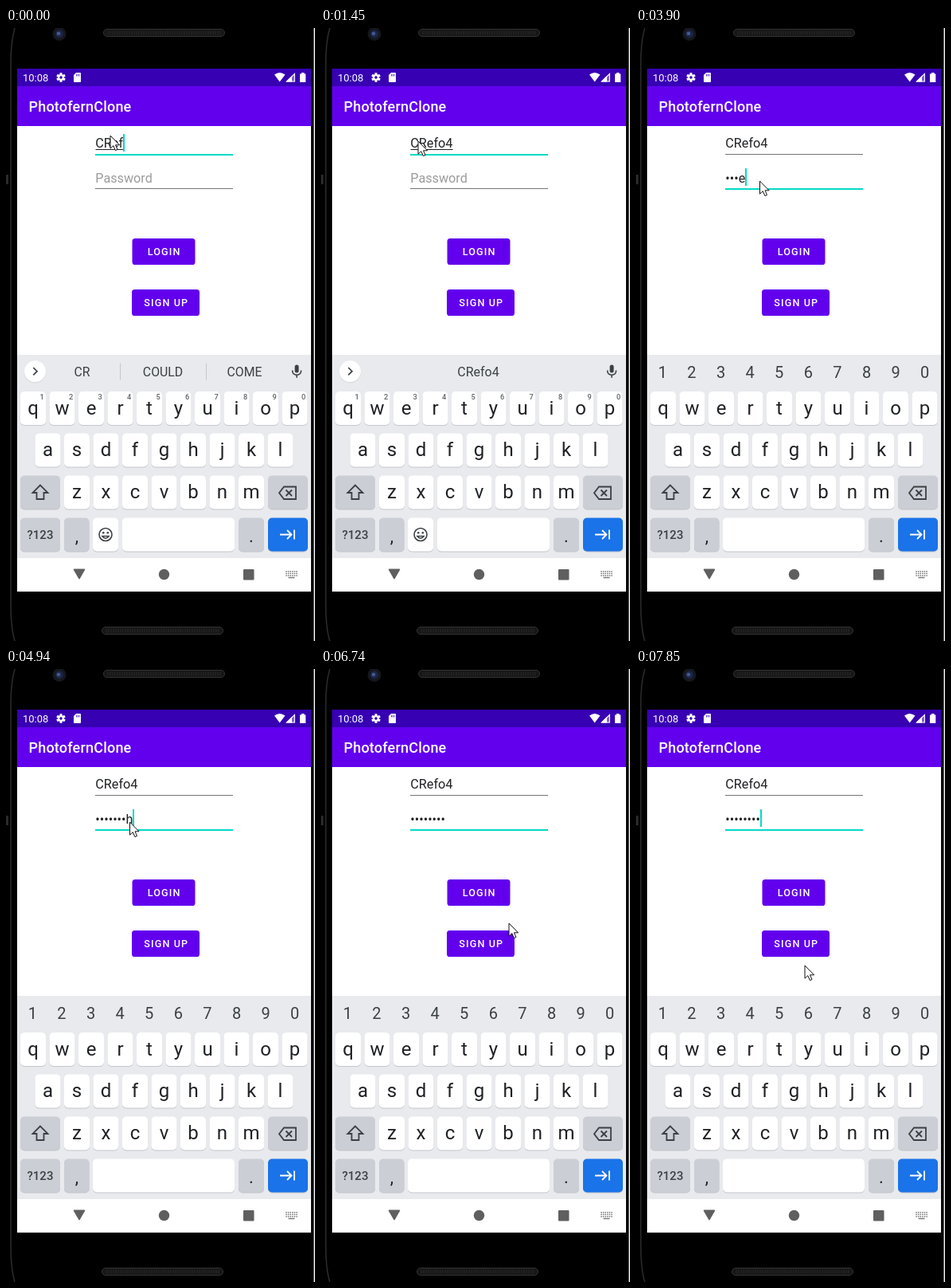
An HTML page for the animation above (8 s loop, 388x769 px).

```html
<!DOCTYPE html>
<html lang="en">
<head>
<meta charset="utf-8">
<title>Login screen</title>
<style>
html, body { margin: 0; width: 100%; height: 100%; overflow: hidden; background: #000; }
svg { display: block; width: 388px; height: 769px; font-family: Roboto, sans-serif; }
</style>
</head>
<body>
<svg id="stage" viewBox="0 0 388 769" xmlns="http://www.w3.org/2000/svg"></svg>
<script>
const LOOP = 8000;
const TEAL = '#03dac5', PURPLE = '#6200ee', INK = '#202124', GREY = '#3c4043';
const stage = document.getElementById('stage');

function add(parent, tag, attrs, text) {
  const el = document.createElementNS('http://www.w3.org/2000/svg', tag);
  for (const k in attrs) el.setAttribute(k, attrs[k]);
  if (text !== undefined) el.textContent = text;
  parent.appendChild(el);
  return el;
}
const group = (parent = stage) => add(parent, 'g', {});
const rect = (p, x, y, width, height, fill, rx = 0) => add(p, 'rect', { x, y, width, height, fill, rx });
const path = (p, d, fill, more) => add(p, 'path', { d, fill, ...more });
const line = (p, d, stroke, w) => path(p, d, 'none', { stroke, 'stroke-width': w });
const circle = (p, cx, cy, r, fill) => add(p, 'circle', { cx, cy, r, fill });
const label = (p, s, x, y, size, fill, more) => add(p, 'text', { x, y, 'font-size': size, fill, ...more }, s);
const MID = { 'text-anchor': 'middle' };
const show = (el, on) => el.setAttribute('visibility', on ? 'visible' : 'hidden');

// Phone body
function speaker(x, y) {
  add(stage, 'rect', { x, y, width: 152, height: 9, rx: 4.5, fill: '#161616', stroke: '#333' });
  add(stage, 'path', { d: `M${x + 5} ${y + 4.5}H${x + 147}`, stroke: '#2b2b2b', 'stroke-width': 5, 'stroke-dasharray': '1 2' });
}
rect(stage, 0, 0, 388, 769, '#000');
line(stage, 'M11 0Q6 18 6 44V724Q6 752 11 769', '#2c2c2c', 1.5);
rect(stage, 0, 184, 3, 12, '#2a2a2a');
rect(stage, 386.5, 0, 1.5, 769, '#eee');
speaker(122.5, 1.5);
speaker(120.5, 751.5);
circle(stage, 67, 7.5, 8.5, '#15171d');
circle(stage, 67, 7.5, 5, '#1c2546');
circle(stage, 66, 7, 2.3, '#41598f');

// Status and app bars
rect(stage, 14, 51, 369, 656, '#fff');
rect(stage, 14, 51, 369, 22, '#3700b3');
rect(stage, 14, 73, 369, 50, PURPLE);
label(stage, '10:08', 21, 67, 13, '#fff');
for (let a = 0; a < 360; a += 60)
  add(stage, 'rect', { x: 67.5, y: 56.2, width: 3, height: 4, fill: '#fff', transform: `rotate(${a} 69 62)` });
add(stage, 'circle', { cx: 69, cy: 62, r: 3, fill: 'none', stroke: '#fff', 'stroke-width': 2.2 });
path(stage, 'M88 56H93Q94 56 94 57V67Q94 68 93 68H86Q85 68 85 67V59Z', '#fff');
line(stage, 'M88.5 58V60.5M90.3 58V60.5M92.1 58V60.5', '#3700b3', 0.8);
path(stage, 'M337 58.5Q343.5 53.5 350.5 58.5L343.7 67.5Z', '#fff');
path(stage, 'M363 56V67.5H351.5Z', '#fff', { opacity: 0.35 });
path(stage, 'M359 60V67.5H351.5Z', '#fff');
line(stage, 'M362.4 57.5V67H352.6Z', '#fff', 1.1);
path(stage, 'M369 57.4H371V56H374.5V57.4H376.3V68H369Z', '#fff');
label(stage, 'PhotofernClone', 28.5, 105, 18, '#fff', { 'font-weight': 500, 'letter-spacing': 0.2 });

// Form
const userLine = rect(stage, 112, 158, 173, 2, TEAL);
const passLine = rect(stage, 112, 201, 173, 1, '#757575');
const user = label(stage, '', 112.3, 150, 16.2, INK);
const composing = rect(stage, 112.5, 152, 10, 1, INK);
const hint = label(stage, 'Password', 112.3, 193.5, 16.2, '#9b9b9b');
const pass = label(stage, '', 112.3, 193.5, 16.2, INK);
const caret = rect(stage, 0, 0, 2, 22, TEAL);

const BTN = { 'font-weight': 500, 'letter-spacing': 1.12 };
rect(stage, 158.5, 264, 79, 33, PURPLE, 3.6);
label(stage, 'LOGIN', 177.7, 285, 12.6, '#fff', BTN);
const shadow = group();
rect(shadow, 156.5, 329, 88, 37, '#000', 5).setAttribute('opacity', 0.06);
rect(shadow, 157.5, 329, 86, 34.5, '#000', 4).setAttribute('opacity', 0.14);
const signUp = rect(stage, 158, 328, 85, 33, PURPLE, 3.6);
label(stage, 'SIGN UP', 173.3, 349, 12.6, '#fff', BTN);

// Keyboard
rect(stage, 14, 410, 369, 255, '#e8eaed');
function key(p, x, y, w, fill = '#fff') {
  rect(p, x, y + 1, w, 42, '#c3c6cb', 5);
  rect(p, x, y, w, 42, fill, 5);
}
const textMode = group(), numMode = group();
function row(chars, x, y) {
  [...chars].forEach((c, i) => {
    const cx = x + 36.5 * i;
    key(stage, cx - 16, y, 32);
    label(stage, c, cx, y + 28.5, 24, INK, MID);
  });
}
const FN = '#cbced5';
row('qwertyuiop', 34, 456);
row('asdfghjkl', 52.5, 508.5);
row('zxcvbnm', 89, 561.5);
key(stage, 18, 561.5, 50, FN);
key(stage, 329, 561.5, 50, FN);
key(stage, 18, 614.5, 50, FN);
key(stage, 73, 614.5, 31.5, FN);
key(stage, 292, 614.5, 32, FN);
key(stage, 329, 614.5, 50, '#1a73e8');
line(stage, 'M43 573.5L33.5 583H38.5V591H47.5V583H52.5Z', GREY, 1.8);
line(stage, 'M349 575.5H364V591H349L343 583.2ZM351.5 579.5L359 587M359 579.5L351.5 587', GREY, 1.8);
line(stage, 'M344 635.5H358M353 630L358.5 635.5L353 641M362 629.5V641.5', '#fff', 1.8);
label(stage, '?123', 43, 641, 15, GREY, { ...MID, 'font-weight': 500 });
label(stage, ',', 88.8, 645, 22, INK, MID);
label(stage, '.', 308, 645, 22, INK, MID);

[...'1234567890'].forEach((d, i) => {
  stage.appendChild(textMode);
  label(textMode, d, 45 + 36.5 * i, 466, 9.2, '#5f6368', { ...MID, 'font-weight': 500 });
  label(numMode, d, 33.3 + 36.6 * i, 438.5, 20, GREY, MID);
});
key(textMode, 109, 614.5, 32);
key(textMode, 146, 614.5, 141);
add(textMode, 'circle', { cx: 125, cy: 635.5, r: 8, fill: 'none', stroke: GREY, 'stroke-width': 1.6 });
circle(textMode, 122.2, 633.2, 1.3, GREY);
circle(textMode, 127.8, 633.2, 1.3, GREY);
line(textMode, 'M120.8 637.5Q125 643 129.2 637.5Z', GREY, 1.4);
key(numMode, 109, 614.5, 178);

circle(textMode, 36.5, 431.5, 13.7, '#d5d7da');
circle(textMode, 36.5, 430.7, 13.5, '#fff');
line(textMode, 'M34.3 426L39 430.7L34.3 435.4', GREY, 1.7);
rect(textMode, 362.6, 422.5, 5, 10, GREY, 2.5);
line(textMode, 'M359.6 429.5Q359.6 435.2 365.1 435.2Q370.6 435.2 370.6 429.5M365.1 435V438.8', GREY, 1.6);
const single = label(textMode, '', 197.5, 437, 16, GREY, MID);
const triple = group(textMode);
[['CR', 95.5], ['COULD', 197], ['COME', 299.5]].forEach(([s, x]) => label(triple, s, x, 437, 15.8, GREY, MID));
line(triple, 'M143.5 420.5V441.5M251.5 420.5V441.5', '#c4c7cb', 1);

// Navigation bar
path(stage, 'M85.5 678.5H98.5Q99.8 678.5 99 680L92.8 690.8Q92 692 91.2 690.8L85 680Q84.2 678.5 85.5 678.5Z', '#5f5f5f');
circle(stage, 198.5, 685.5, 6.7, '#5f5f5f');
rect(stage, 298, 679, 13.5, 13.5, '#5f5f5f', 1);
for (let r = 0; r < 3; r++)
  for (let c = 0; c < 6; c++) rect(stage, 351.3 + c * 2.6, 681 + r * 2.6, 1.5, 1.5, '#777');
rect(stage, 354.5, 688.8, 8, 1.4, '#777');

const pointer = path(stage, 'M0 0V16.2L3.8 12.7L6.4 18.6L9 17.5L6.5 11.8H11.6Z', '#fff',
  { stroke: '#111', 'stroke-width': 1, 'stroke-linejoin': 'round' });

// Timelines: [start, ...values], each held until the next
const NAME = 'CRefo4', SECRET = 'bluedash';
const pointerAt = [
  [0, 131, 135], [1330, 126, 121], [1450, 122, 142], [1600, 137, 165], [1720, 152, 186], [1850, 155.5, 192],
  [5640, 158, 184], [5780, 190, 152], [5920, 235, 131], [6060, 266, 160], [6200, 280, 250], [6340, 278, 330],
  [6480, 262, 378], [6620, 243, 345], [6740, 236, 319], [6900, 236, 325], [7070, 230, 333], [7240, 220, 341],
  [7420, 212, 346], [7590, 211, 347], [7850, 212, 372]
];
const nameLen = [[0, 4], [150, 5], [780, 6]];
const nameMarked = [[0, 4], [400, 5], [1060, 6], [1720, 0]];
const caretOn = [[0, 1], [1330, 0], [1850, 1], [2440, 0], [2820, 1], [5340, 0], [5920, 1], [6340, 0], [6900, 1], [7420, 0], [7850, 1]];
// typed count, last letter visible
const secretAt = [[0, 0, 0], [3370, 1, 1], [3500, 2, 1], [3640, 2, 0], [3770, 3, 1], [3900, 4, 1], [4270, 5, 1],
  [4540, 6, 1], [4740, 7, 1], [4940, 8, 1], [6480, 8, 0]];
const at = (list, t) => list.reduce((found, k) => (k[0] <= t ? k : found));

function setLine(el, y, focused) {
  el.setAttribute('y', y);
  el.setAttribute('height', focused ? 2 : 1);
  el.setAttribute('fill', focused ? TEAL : '#757575');
}

function draw(t) {
  const onPass = t >= 1720, numbers = t >= 1850;
  setLine(userLine, 158, !onPass);
  setLine(passLine, 201, onPass);

  const marked = at(nameMarked, t)[1];
  user.textContent = NAME.slice(0, at(nameLen, t)[1]);
  composing.setAttribute('width', marked ? user.getSubStringLength(0, marked) : 0);

  const [, n, open] = at(secretAt, t);
  pass.textContent = '•'.repeat(n - open) + (open ? SECRET[n - 1] : '');
  show(hint, n === 0);

  const field = onPass ? pass : user;
  const width = field.textContent ? field.getComputedTextLength() : 0;
  caret.setAttribute('x', Math.round(112.3 + width));
  caret.setAttribute('y', onPass ? 176 : 133);
  show(caret, at(caretOn, t)[1]);

  textMode.style.display = numbers ? 'none' : '';
  numMode.style.display = numbers ? '' : 'none';
  triple.style.display = t < 400 ? '' : 'none';
  single.textContent = t < 400 ? '' : NAME.slice(0, marked || 6);

  const pressed = t >= 7590 && t < 7850;
  show(shadow, pressed);
  signUp.setAttribute('fill', pressed ? '#8338f1' : PURPLE);

  const [, x, y] = at(pointerAt, t);
  pointer.setAttribute('transform', `translate(${x} ${y})`);
}

let start;
function tick(now) {
  if (start === undefined) start = now;
  draw((now - start) % LOOP);
  requestAnimationFrame(tick);
}
stage.appendChild(numMode);
stage.appendChild(pointer);
draw(0);
requestAnimationFrame(tick);
</script>
</body>
</html>
```
